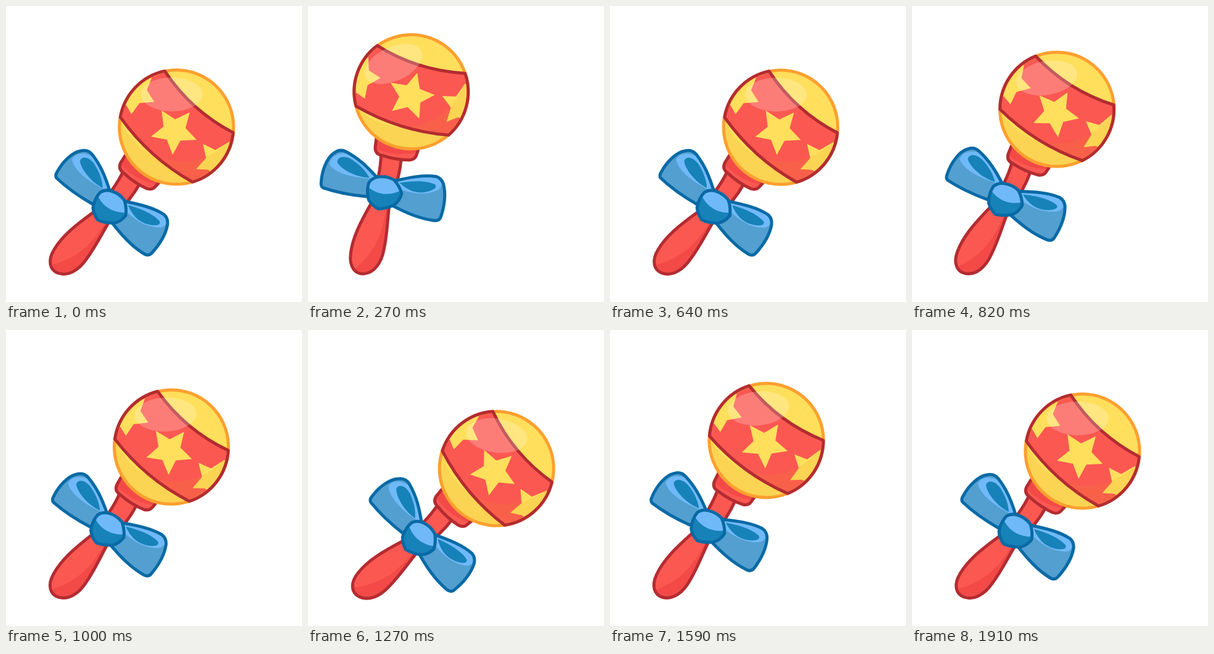
Animation of 480 by 480 pixels, one loop 1960 ms. Source, as an HTML page:

```html
<!DOCTYPE html>
<html lang="en">
<head>
<meta charset="utf-8">
<title>Rattle</title>
<style>
  html, body { margin: 0; width: 100%; height: 100%; overflow: hidden; background: #fff; }
  svg { display: block; width: 100vw; height: 100vh; }
  .line { fill: none; stroke-width: 5; stroke-linejoin: round; stroke-linecap: round; }
  .red { fill: #fb5852; }
  .redLine { stroke: #b32c31; }
  .blue { fill: #539fd0; }
  .blueLine { stroke: #086aa5; }
  .light { fill: #70b9f8; }
  .deep { fill: #1782b8; }
  .yellow { fill: #ffdf5c; }
  .shade { fill: #d81f2c; opacity: .24; }
</style>
</head>
<body>
<svg viewBox="0 0 480 480">
  <defs>
    <path id="handle" d="M190 268C179 292 160 315 141 335C112 356 91 373 78 395C67 413 71 428 84 433C101 439 118 428 130 411C145 391 154 372 166 352C180 334 199 320 217 288Z"/>
    <path id="collar" d="M196 238L186 254Q181 264 191 271Q208 287 228 296Q237 299 242 293L254 280Z"/>
    <path id="band" d="M258 105Q300 169 369 205A92.8 92.8 0 0 1 303 285Q233 246 186 180A92.8 92.8 0 0 1 258 105Z"/>
    <path id="wingL" d="M140 321C119 309 101 297 82 279Q79 275 83 269C92 252 108 237 121 235Q133 232 140 241C154 259 161 277 168 299Z"/>
    <path id="wingR" d="M194 317C218 322 239 327 256 338Q263 344 262 354C259 371 248 388 236 401Q231 406 224 402C203 389 187 371 170 349Z"/>
    <path id="knot" d="M153 302Q161 297 171 300Q184 304 192 315Q196 328 194 340Q186 350 175 352Q160 352 149 347Q142 338 141 327Q144 311 153 302Z"/>
    <clipPath id="inHandle"><use href="#handle"/></clipPath>
    <clipPath id="inCollar"><use href="#collar"/></clipPath>
    <clipPath id="inHead"><circle cx="277" cy="196" r="91"/></clipPath>
    <clipPath id="inKnot"><use href="#knot"/></clipPath>
  </defs>

  <g id="rattle">
    <use href="#handle" class="red"/>
    <path class="shade" clip-path="url(#inHandle)" d="M225 285C195 312 170 340 154 362C134 392 110 410 74 420V445H140L190 360Z"/>
    <use href="#handle" class="line redLine"/>

    <use href="#collar" class="red"/>
    <path class="shade" clip-path="url(#inCollar)" d="M180 250C198 272 220 286 250 290L262 270L200 230Z"/>
    <use href="#collar" class="line redLine"/>

    <g transform="translate(-.6 .4)">
      <circle class="yellow" cx="277" cy="196" r="93"/>
      <use href="#band" class="red"/>
      <g clip-path="url(#inHead)">
        <g class="yellow">
          <path id="star"/>
          <path d="M237 116L229 136L241 155L217 157L204 175L196 161L182 150L215 112Z"/>
          <path d="M320 223L340 233L362 220L378 236L340 272L328 265L309 264L325 246Z"/>
        </g>
        <path fill="#e08c20" opacity=".14" fill-rule="evenodd" d="M180 100H375V295H180ZM181 150a104 102 0 1 0 208 0a104 102 0 1 0 -208 0Z"/>
      </g>
      <circle class="line" cx="277" cy="196" r="92.6" stroke="#ff9f2f"/>
      <use href="#band" class="line redLine"/>
      <ellipse cx="269.5" cy="143" rx="50" ry="27.5" fill="#fff" opacity=".22"/>
    </g>

    <use href="#wingL" class="blue"/>
    <path class="light" d="M160 298C132 284 110 266 107 249C112 238 128 237 140 244C155 262 161 280 166 297Z"/>
    <path class="deep" d="M157 295C138 286 121 264 120 251C123 243 134 244 143 256C152 270 156 282 157 295Z"/>
    <use href="#wingL" class="line blueLine"/>

    <use href="#wingR" class="blue"/>
    <path class="light" d="M193 318C222 322 246 330 258 341C262 350 261 356 252 359C230 361 208 347 192 330Z"/>
    <path class="deep" d="M198 323C217 328 239 337 249 349C252 356 242 357 230 354C214 350 204 338 198 323Z"/>
    <use href="#wingR" class="line blueLine"/>

    <use href="#knot" class="deep"/>
    <path class="light" clip-path="url(#inKnot)" d="M148 306C155 323 172 337 198 335V290H150Z"/>
    <use href="#knot" class="line blueLine"/>
  </g>
</svg>
<script>
  const LOOP = 1960, STEP = 500 / 11, LAST = 42;
  const REST = 40;

  // Swing extremes: [step, degrees from upright]
  const swings = [
    [0, REST], [1.5, 40.7], [7.3, 12.1], [12.8, 43.4], [17, 25.8], [20.3, 46],
    [24.6, 22.1], [29.6, 55.9], [33.5, 26], [37.5, 53], [LAST, REST]
  ];

  function angleAt(step) {
    const k = Math.max(1, swings.findIndex(s => s[0] >= step));
    const [t0, a0] = swings[k - 1], [t1, a1] = swings[k];
    const u = (step - t0) / (t1 - t0);
    return a0 + (a1 - a0) * (1 - Math.cos(Math.PI * u)) / 2;
  }

  function starPath(cx, cy, r, turn) {
    const points = Array.from({ length: 10 }, (_, i) => {
      const a = (turn + i * 36) * Math.PI / 180;
      const d = i % 2 ? r * 0.48 : r;
      return (cx + d * Math.cos(a)).toFixed(1) + " " + (cy + d * Math.sin(a)).toFixed(1);
    });
    return "M" + points.join("L") + "Z";
  }

  const rattle = document.getElementById("rattle");
  document.getElementById("star").setAttribute("d", starPath(273.5, 202, 39, 94));

  function draw() {
    const t = performance.now() % LOOP;
    const step = Math.min(LAST, Math.floor((Math.floor(t / 10) * 10 + 5) / STEP));
    const turn = angleAt(step) - REST;
    rattle.setAttribute("transform", `rotate(${turn.toFixed(3)} 90 419)`);
    requestAnimationFrame(draw);
  }
  draw();
</script>
</body>
</html>
```
